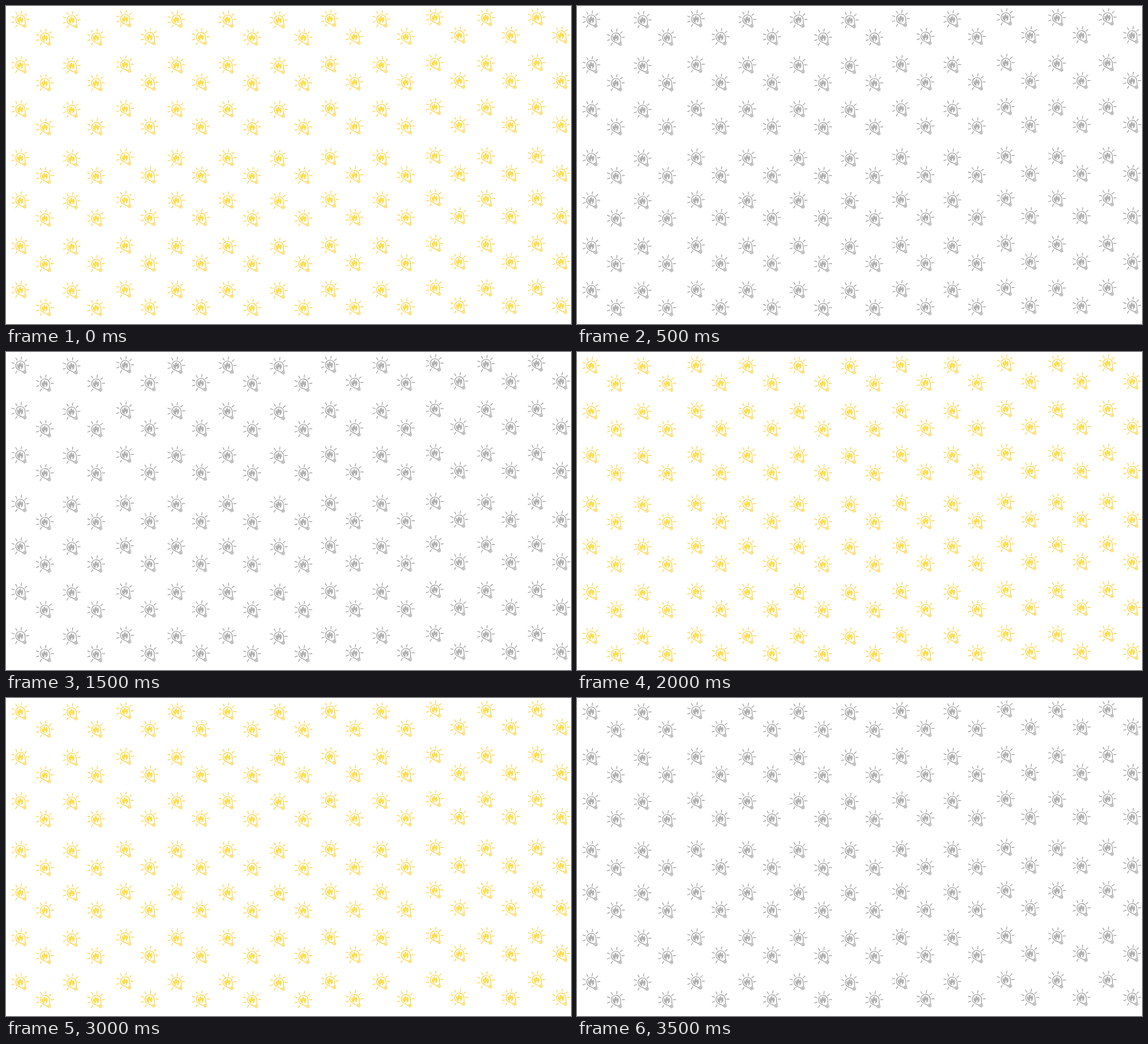
An HTML page for the animation above (4000 ms loop, 998 by 561 pixels).

```html
<!DOCTYPE html>
<html>
<head>
<meta charset="utf-8">
<style>
  html, body { margin: 0; width: 100%; height: 100%; overflow: hidden; background: #fff; }
  svg { display: block; }
  .lit { --line: #fcca1c; --flame: #ffe04a; }
  .off { --line: #8c8c8c; --flame: #b2b2b2; }
</style>
</head>
<body>
<svg id="stage" class="lit" width="998" height="561" viewBox="0 0 998 561">
  <defs>
    <g id="bulb" fill="none" stroke="var(--line)" stroke-width="1.1" stroke-linecap="round" stroke-linejoin="round">
      <path transform="translate(.4) rotate(-34)" d="M-3.1 11.5C-3.1 8-8.2 5.6-8.2 0A8.2 8.2 0 0 1 8.2 0C8.2 5.6 3.1 8 3.1 11.5ZM-3 13.7H3M-2 15.7H2"/>
      <path fill="var(--flame)" stroke-width=".4"
        d="M-.6 6C-4.6 5.2-6 .4-4.6-3-4.2-1.6-3.4-.6-2.4-.2-2.8-3-1.2-5 .6-5.8.4-3.6 1.8-2.8 2.4-1.2 3-2 3.4-3 3.4-4.2 6-1 5.6 4.6 1.6 6 3.2 3.6 1.6 1.8.8.4.4 1.8-1.6 3-.6 6Z"/>
    </g>
  </defs>
</svg>
<script>
  const stage = document.getElementById('stage');
  const bulb = document.getElementById('bulb');

  function add(parent, tag, attributes) {
    const node = document.createElementNS(stage.namespaceURI, tag);
    for (const name in attributes) node.setAttribute(name, attributes[name]);
    parent.append(node);
  }

  for (let i = 0; i < 7; i++) {
    add(bulb, 'path', { d: 'M11 0H15.6', transform: `rotate(${-2 - 39.5 * i})` });
  }

  // Each cluster holds two staggered pairs; rows repeat every four.
  const clusters = [[25, 24], [210, 23], [391, 24], [572, 22.5], [757, 20], [937, 20]];
  const rowOffsets = [0, 80.3, 158, 244];
  const rowPeriod = 319;

  for (let row = 0; row < 7; row++) {
    const dy = rowOffsets[row % 4] + rowPeriod * Math.floor(row / 4);
    for (const [left, top] of clusters) {
      for (let i = 0; i < 4; i++) {
        const x = left + 45.3 * i - 2 * (i % 2);
        const y = top + dy + (i % 2 ? 31.7 : i / 2);
        if (x < 990) add(stage, 'use', { href: '#bulb', x, y });
      }
    }
  }

  const start = performance.now();
  function draw() {
    const lit = Math.floor((performance.now() - start) / 500) % 2 === 0;
    stage.setAttribute('class', lit ? 'lit' : 'off');
    requestAnimationFrame(draw);
  }
  draw();
</script>
</body>
</html>
```
